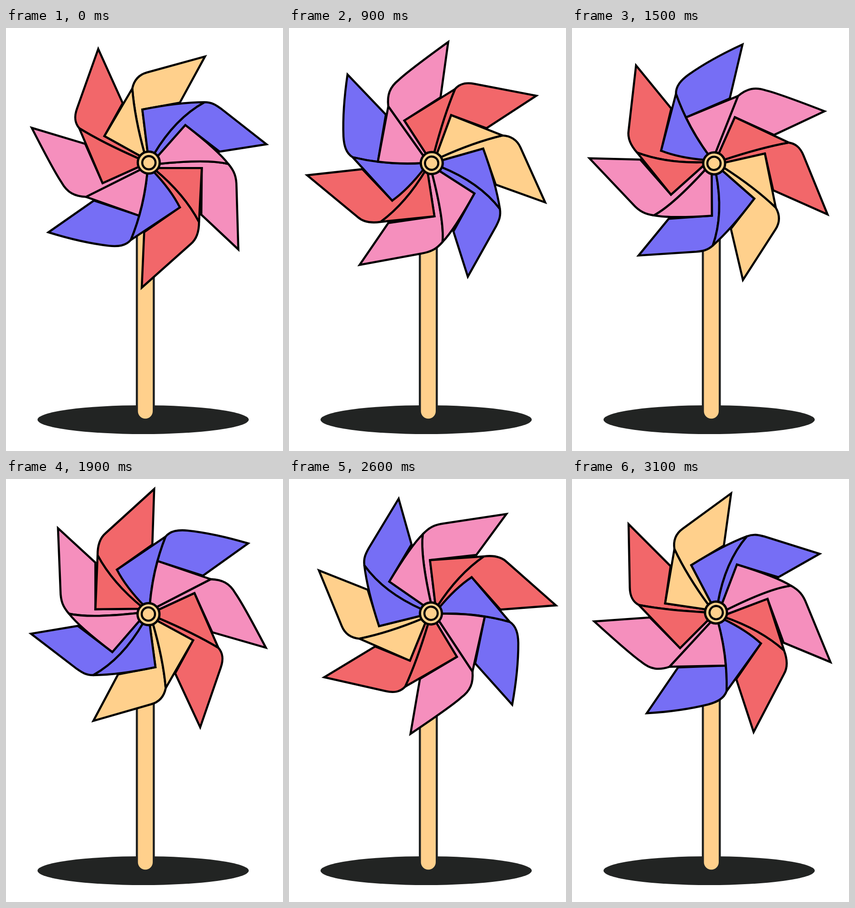
An HTML page with a canvas for the animation above (3200 ms loop, 606 px wide and 925 px high).

```html
<!DOCTYPE html>
<html lang="en">
<head>
<meta charset="utf-8">
<title>Pinwheel</title>
<style>
  html, body { margin: 0; width: 100%; height: 100%; overflow: hidden; background: #fff; }
  canvas { display: block; }
</style>
</head>
<body>
<canvas id="stage" width="606" height="925"></canvas>
<script>
const ctx = document.getElementById('stage').getContext('2d');
const TAN = '#ffd08c', BLUE = '#766ef5', PINK = '#f58fbd', RED = '#f2676a';
const INK = '#000', DARK = '#222423';
const HUB = { x: 312, y: 294 };
const LOOP = 3200, STEP = 100, LINE = 4.6;

// side: hub to flap corner; edge: corner to fold; crease: fold back to hub;
// sail: roll, tip and the point where the next flap covers it
const blades = [
  { color: TAN, start: '296 281', side: 'L', corner: '215 236', edge: 'L', fold: '276 132',
    bend: '281 196', end: '303 275', sail: 'C280 113 290 102 308 97 L435 62 L380 163' },
  { color: BLUE, start: '310 275', side: 'L', corner: '298 178', edge: 'Q378 162', fold: '434 162',
    bend: '370 197', end: '323 276', sail: 'C450 162 459 168 470 176 L569.5 254 L467 270' },
  { color: PINK, start: '330 282', side: 'L', corner: '392 212', edge: 'Q464 268', fold: '486 297',
    bend: '440 286', end: '332 297', sail: 'C499 312 504 325 504 347 L508 484 L427 408' },
  { color: RED, start: '331 306', side: 'L', corner: '428 306', edge: 'L', fold: '422 424',
    bend: '390 363', end: '325 309', sail: 'C422 445 416 462 404 472 L296.7 567.5 L302 446' },
  { color: BLUE, start: '321 312', side: 'Q361 354', corner: '380 392', edge: 'L', fold: '273 463',
    bend: '302 392', end: '309 314', sail: 'C262 476 245 478 225 476 Q165 469 92.5 446.5 L192 377' },
  { color: PINK, start: '309 314', side: 'Q304 365', corner: '291 410', edge: 'L', fold: '175 369',
    bend: '235 339', end: '295 309', sail: 'C150 368 134 360 121 337 Q104 312 56 218 L173 253' },
  { color: RED, start: '293 302', side: 'L', corner: '211 339', edge: 'L', fold: '160 219',
    bend: '212 251', end: '292 286', sail: 'C148 205 150 190 155 176 L201.5 45.5 L255 164' }
];

blades.forEach((b, i) => {
  const next = blades[(i + 1) % blades.length];
  b.body = new Path2D(`M${b.end} Q${b.bend} ${b.fold} ${b.sail} L${next.corner} L${next.start} Z`);
  b.flap = new Path2D(`M${b.start} ${b.side} ${b.corner} ${b.edge} ${b.fold} Q${b.bend} ${b.end} Z`);
});

// [step, degrees, hub x, hub y]
const poses = [
  [0, 0, 312.3, 294.3],
  [5, 42.7, 310, 294.5],
  [9, 81.2, 312.3, 295.3],
  [15, 138.2, 311, 296],
  [22, 210.3, 312.3, 295.3],
  [26, 263.1, 310.5, 294],
  [31, 339.3, 315, 292],
  [32, 360, 312.3, 294.3]
];

function poseAt(step) {
  const i = poses.findIndex(p => p[0] > step);
  const a = poses[i - 1], b = poses[i];
  const k = (step - a[0]) / (b[0] - a[0]);
  return a.map((v, j) => v + (b[j] - v) * k);
}

function paint(path, fill, width) {
  ctx.fillStyle = fill;
  ctx.lineWidth = width;
  ctx.fill(path);
  ctx.stroke(path);
}

function disc(x, y, r, width) {
  const path = new Path2D();
  path.arc(x, y, r, 0, Math.PI * 2);
  paint(path, TAN, width);
}

function drawStand() {
  ctx.fillStyle = DARK;
  ctx.beginPath();
  ctx.ellipse(300, 856.5, 231, 31.5, 0, 0, Math.PI * 2);
  ctx.fill();
  ctx.strokeStyle = DARK;
  paint(new Path2D('M286.3 300 V838 A18.5 18.5 0 0 0 323.3 838 V300'), TAN, LINE);
}

function drawWheel([, degrees, x, y]) {
  ctx.save();
  ctx.translate(x, y);
  ctx.rotate(degrees * Math.PI / 180);
  ctx.translate(-HUB.x, -HUB.y);
  ctx.strokeStyle = INK;
  ctx.miterLimit = 3;
  for (const b of blades) paint(b.body, b.color, LINE);
  for (const b of blades) paint(b.flap, b.color, LINE);
  disc(HUB.x, HUB.y, 24, 5);
  disc(HUB.x + 0.3, HUB.y + 0.3, 14.5, 4.6);
  ctx.restore();
}

function draw() {
  const step = Math.floor(performance.now() % LOOP / STEP);
  ctx.fillStyle = '#fff';
  ctx.fillRect(0, 0, 606, 925);
  drawStand();
  drawWheel(poseAt(step));
  requestAnimationFrame(draw);
}
draw();
</script>
</body>
</html>
```
